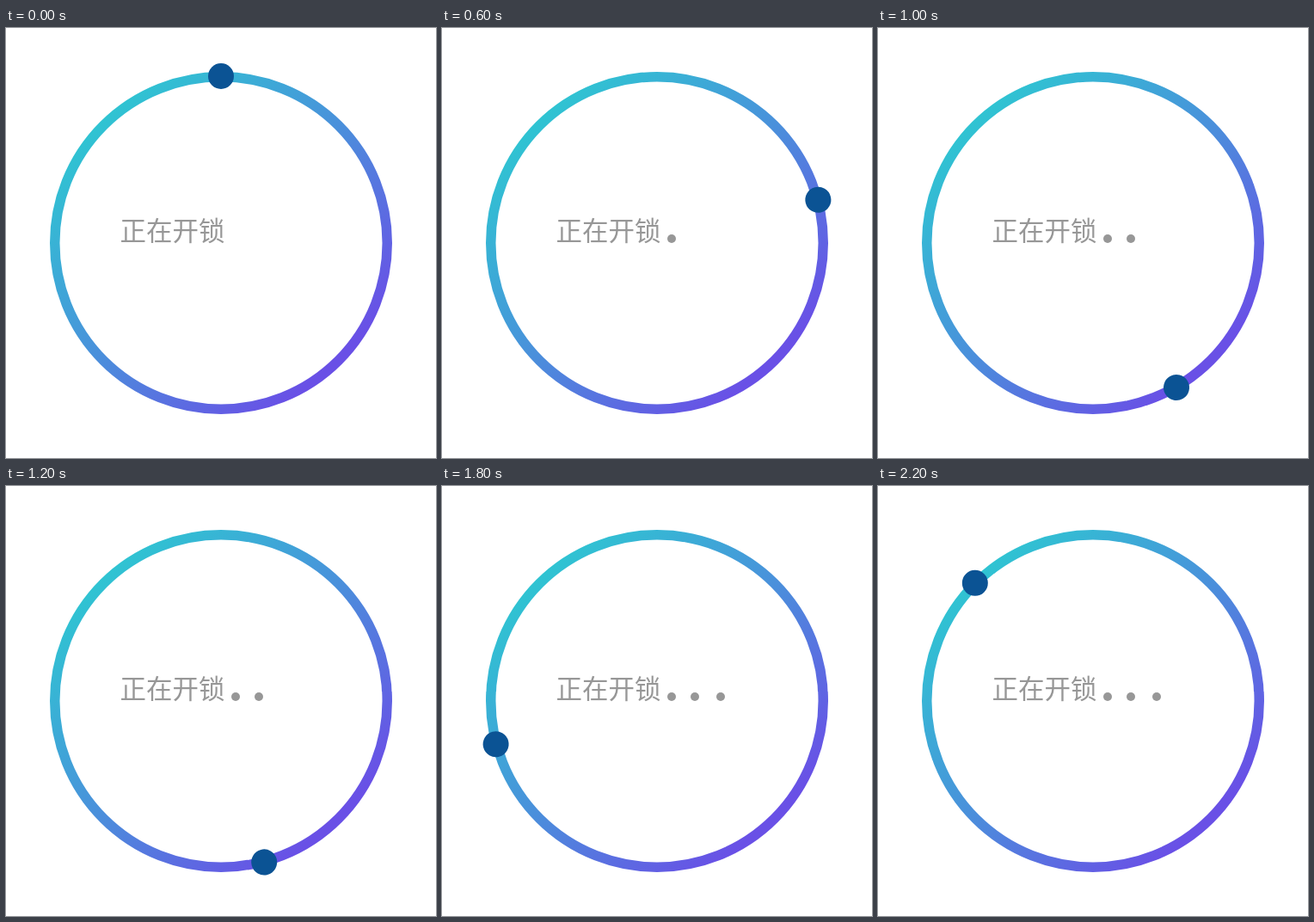
An HTML page for the animation above (2.4 s loop, 500 by 500 pixels).

```html
<!DOCTYPE html>
<html lang="zh-CN">
<head>
<meta charset="utf-8">
<style>
  html, body { margin: 0; width: 100%; height: 100%; overflow: hidden; background: #fff; }
  svg { display: block; width: 100%; height: 100%; }
  text { font: 30.5px "Noto Sans CJK SC", "Noto Sans CJK", "Noto Sans CJK JP", sans-serif; }
</style>
</head>
<body>
<svg viewBox="0 0 500 500">
  <defs>
    <linearGradient id="ring" gradientUnits="userSpaceOnUse" x1="113" y1="104" x2="381" y2="387">
      <stop offset="0" stop-color="#2fc4d2"/>
      <stop offset=".5" stop-color="#4a90db"/>
      <stop offset="1" stop-color="#6950e6"/>
    </linearGradient>
  </defs>
  <circle cx="250" cy="250" r="193.25" fill="none" stroke="url(#ring)" stroke-width="11.5"/>
  <g fill="#979797">
    <text x="132.5" y="247.2">正在开锁</text>
    <circle class="dot" cx="267" cy="245" r="5"/>
    <circle class="dot" cx="294" cy="245" r="5"/>
    <circle class="dot" cx="324" cy="245" r="5"/>
  </g>
  <circle id="knob" cx="250" cy="56" r="15" fill="#0b5394"/>
</svg>
<script>
  const STEP = 200, STEPS = 12;
  const onMark = [0, 5]; // steps that land on a clock mark; the others fall halfway before it
  const knob = document.getElementById('knob');
  const dots = document.querySelectorAll('.dot');
  const start = performance.now();

  function draw() {
    const step = Math.floor((performance.now() - start) / STEP) % STEPS;
    const angle = 30 * step - (onMark.includes(step) ? 0 : 15);
    knob.setAttribute('transform', `rotate(${angle} 250 250)`);
    // One more dot every four steps
    dots.forEach((dot, i) => {
      dot.style.visibility = step > 4 * i ? 'visible' : 'hidden';
    });
    requestAnimationFrame(draw);
  }
  draw();
</script>
</body>
</html>
```
